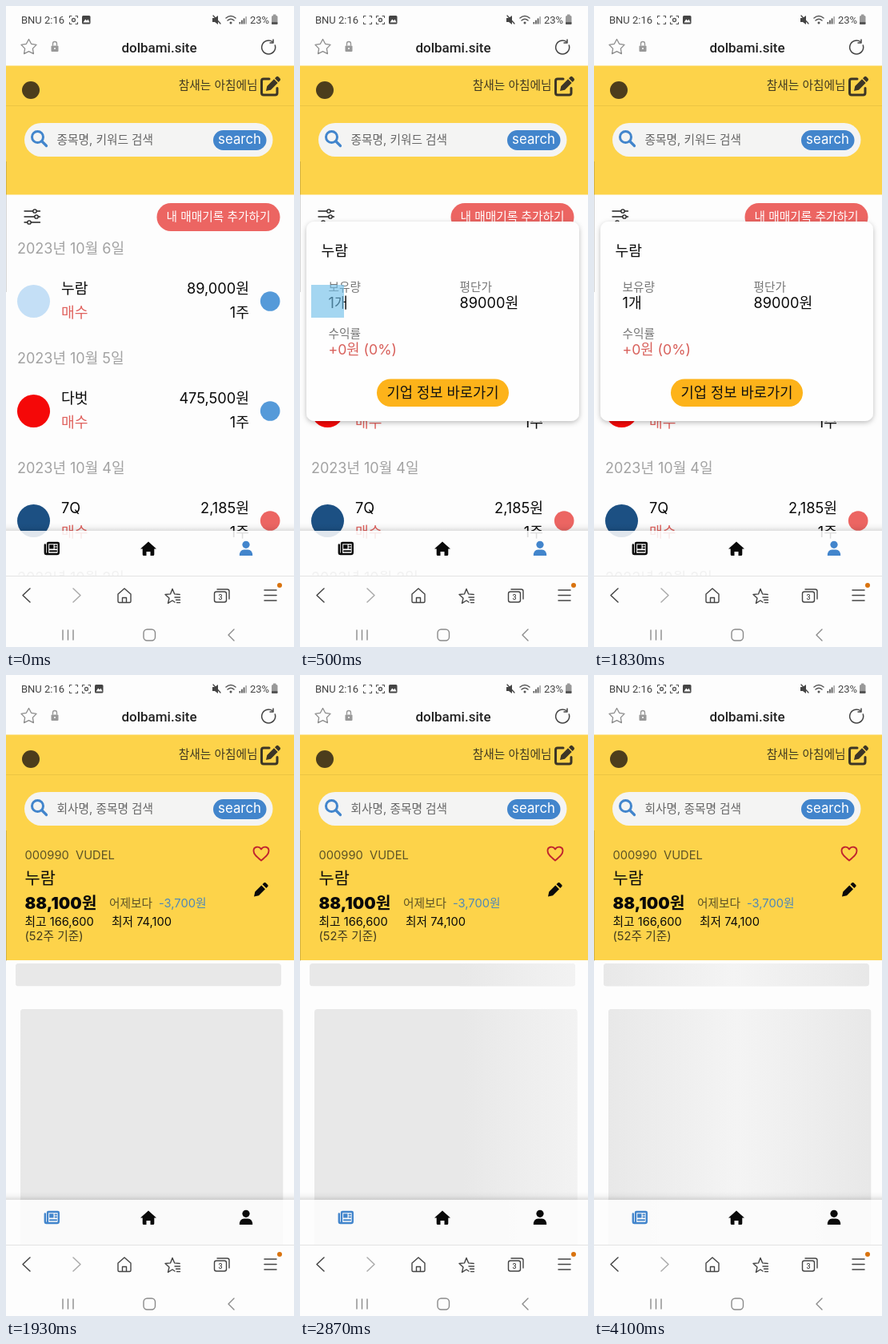
Write an HTML page that moves like this. It is 360 by 800 pixels and loops after 4210 ms.

```html
<!DOCTYPE html>
<html lang="ko">
<head>
<meta charset="utf-8">
<style>
html, body { margin: 0; width: 100%; height: 100%; overflow: hidden; background: #fdfdfd; }
svg { display: block; width: 360px; height: 800px; }
text { font-family: Inter, "Noto Sans CJK KR", "Noto Sans CJK", sans-serif; white-space: pre; }
.ui { font-family: Roboto, sans-serif; }
.line { fill: none; stroke-linecap: round; stroke-linejoin: round; }
</style>
</head>
<body>
<svg id="stage" viewBox="0 0 360 800"></svg>
<script>
const LOOP = 4210, RECORD = 250, TAP = 330, POPUP = 420, RELEASE = 570, PAGE = 1865;
const SHIMMER = 1500;
const BLUE = '#4285cc', RED = '#e0625e', YELLOW = '#fdd34a', OLIVE = '#5d5326';
const SMALL = 14.7, LARGE = 18.2;

const text = (x, y, size, str, fill = '#0a0a0a', extra = '') =>
  `<text x="${x}" y="${y}" font-size="${size}" fill="${fill}" ${extra}>${str}</text>`;
const rect = (x, y, w, h, fill, r = 0, extra = '') =>
  `<rect x="${x}" y="${y}" width="${w}" height="${h}" fill="${fill}" rx="${r}" ${extra}/>`;
const circle = (x, y, r, fill, extra = '') =>
  `<circle cx="${x}" cy="${y}" r="${r}" fill="${fill}" ${extra}/>`;
const line = (d, stroke, width = 1.5, extra = '') =>
  `<path class="line" d="${d}" stroke="${stroke}" stroke-width="${width}" ${extra}/>`;
const shape = (d, fill, extra = '') => `<path d="${d}" fill="${fill}" ${extra}/>`;
const group = (id, body) => `<g id="${id}">${body}</g>`;
const END = 'text-anchor="end"', MID = 'text-anchor="middle"';

function star(cx, cy, r) {
  let d = '';
  for (let i = 0; i < 10; i++) {
    const a = (i / 5 - 0.5) * Math.PI, k = i % 2 ? r * 0.52 : r;
    d += `${i ? 'L' : 'M'}${(cx + k * Math.cos(a)).toFixed(1)} ${(cy + k * Math.sin(a)).toFixed(1)}`;
  }
  return d + 'Z';
}

const brackets = x => line(
  `M${x + 0.5} 14.500v-2h2.500m5 0h2.500v2m0 6v2h-2.500m-5 0h-2.500v-2`, '#555', 1.1);
const lens = (x, id) => group(id, circle(x + 5.5, 17.5, 2, 'none', 'stroke="#555" stroke-width="1.3"'));
const picture = rect(0, 12, 10.5, 10.5, '#444', 1.5) + shape('M1.5 20.500l2.700-4 2 2 1.300-2 2 4z', '#fff');

const statusBar = () =>
  text(19, 22, 13, 'BNU', '#444', 'class="ui"') +
  text(48, 22, 13, '2:16', '#444', 'class="ui"') +
  brackets(79) + lens(79, 'blink') +
  group('second', brackets(95) + lens(95, 'still')) +
  group('picture', picture) +
  shape('M258 15h3l4-3v11l-4-3h-3z', '#444') + line('M259 12l9 10', '#444', 1.3) +
  line('M275 15q6-5 12 0M277 18q4-3.500 8 0', '#555', 1.5) + circle(281, 21, 1.5, '#555') +
  [0, 1, 2, 3].map(i => rect(291.5 + i * 2.6, 20 - i * 2.3, 1.7, 2.5 + i * 2.3, i < 3 ? '#555' : '#aaa')).join('') +
  text(305, 22, 13, '23%', '#444', 'class="ui"') +
  rect(332, 12, 7.5, 11, '#999', 1.5) + rect(334, 10.5, 3.5, 2, '#999') + rect(332, 20, 7.5, 3, '#555', 1);

const addressBar = () =>
  line(star(28.5, 51.5, 10), '#8c8c8c', 1.3) +
  rect(56.5, 49.5, 9, 7.5, '#999', 1) + line('M58.500 49v-2a2.500 2.500 0 0 1 5 0v2', '#999', 1.4) +
  circle(61, 53, 1, '#fff') +
  text(191.5, 58, 17, 'dolbami.site', '#222', `class="ui" font-weight="500" ${MID}`) +
  line('M333 44.500a8.500 8.500 0 1 0 3.300 4.500', '#444', 1.5) + line('M330 46h4v-4', '#444', 1.5);

const editIcon = '#3c3526';
const header = () =>
  rect(0, 124, 360, 1, '#ecc543') +
  circle(31, 105, 11, '#4c3d1c') +
  text(314.5, 104, SMALL, '참새는 아침에님', '#3f3820', END) +
  line('M329 91h-7q-2.500 0-2.500 2.500v15q0 2.500 2.500 2.500h14.500q2.500 0 2.500-2.500v-6', editIcon, 3) +
  shape('M325 106l1.300-6 8.700-8.700 4.700 4.700-8.700 8.700zM336 90.200l2-2q1.200-1 2.400 0l2.200 2.300q1 1.200 0 2.400l-2 2z', editIcon);

const search = hint =>
  rect(23, 146, 310.5, 42, '#f4f4f3', 21) +
  circle(39.5, 163.5, 7, 'none', `stroke="${BLUE}" stroke-width="3"`) +
  line('M45 169l5.500 5.500', BLUE, 3.2) +
  text(63.5, 171.5, SMALL, hint, '#666') +
  rect(259, 155, 66.5, 25, BLUE, 12.5) +
  text(292, 172, 16.8, 'search', '#fff', MID);

function row(i, day, name, price, logo, dot) {
  const y = 302 + 137 * i;
  return text(14, y + 6.5, 18, `2023년 10월 ${day}일`, '#a2a2a2') + (name ?
    circle(34.5, y + 66.5, 20.5, logo) +
    text(69, y + 56.5, LARGE, name) + text(69, y + 86.5, LARGE, '매수', RED) +
    text(304, y + 56.5, LARGE, price, undefined, END) +
    text(304, y + 86.5, LARGE, '1주', undefined, END) +
    circle(330.2, y + 66.5, 12.3, dot) : '');
}

const filterIcon = [[256, 36], [263, 38], [270, 29]].map(([y, x]) =>
  line(`M23 ${y}h19.500`, '#222', 1.3) +
  circle(x, y, 2.2, '#fdfdfd', 'stroke="#222" stroke-width="1.300"')).join('');

const list = () =>
  rect(0, 74.5, 360, 161, YELLOW) + search('종목명, 키워드 검색') + filterIcon +
  rect(188.5, 246, 154, 35, '#ec6562', 17.5) +
  text(265.5, 268, SMALL, '내 매매기록 추가하기', '#fff', MID) +
  row(0, 6, '누람', '89,000원', '#c4dff6', '#559ad9') +
  row(1, 5, '다벗', '475,500원', '#f50808', '#559ad9') +
  row(2, 4, '7Q', '2,185원', '#1c5083', '#ec6562') +
  row(3, 2);

const popup = () =>
  rect(8, 269, 341, 249, '#fefefe', 10, 'filter="url(#shade)"') +
  text(26.5, 312, LARGE, '누람') +
  text(35.5, 355.5, SMALL, '보유량', '#777') + text(35.5, 376.5, LARGE, '1개') +
  text(199.5, 355.5, SMALL, '평단가', '#777') + text(199.5, 376.5, LARGE, '89000원') +
  text(35.5, 414, SMALL, '수익률', '#777') + text(35.5, 435, 17.7, '+0원 (0%)', '#d8605b') +
  rect(96, 465.5, 165, 34.5, '#fdb31a', 17.2) +
  text(178.5, 488.5, 17.7, '기업 정보 바로가기', '#111', MID);

const bone = (id, x, y, w, h) =>
  `<clipPath id="${id}Clip">${rect(x, y, w, h, '#000', 4)}</clipPath>` +
  `<g clip-path="url(#${id}Clip)">${rect(x, y, w, h, '#e8e8e8')}` +
  rect(x, y, w, h, 'url(#glow)', 0, `id="${id}"`) + '</g>';

const stock = () =>
  rect(0, 74.5, 360, 281.5, YELLOW) + search('회사명, 종목명 검색') +
  text(23.5, 230, SMALL, '000990', OLIVE) + text(87, 230, SMALL, 'VUDEL', OLIVE) +
  text(23.5, 261, 20.8, '누람') +
  text(23.5, 292, 20.4, '88,100원', undefined, 'font-weight="900"') +
  text(129, 290, SMALL, '어제보다', OLIVE) + text(191, 290, SMALL, '-3,700원', '#4e88b8') +
  text(23.5, 313, SMALL, '최고 166,600') + text(132, 313, SMALL, '최저 74,100') +
  text(23.5, 331, SMALL, '(52주 기준)', '#433c1e') +
  line('M319 231.500C313 226.500 309.500 223.500 309.500 219.500C309.500 214 316 213 319 217.500C322 213 328.500 214 328.500 219.500C328.500 223.500 325 226.500 319 231.500Z', '#c0242f', 1.9) +
  shape('M310 276.500l1.300-6 8-8 4.700 4.700-8 8zM320.500 261.300l2-2q1-.800 2 0l2.800 2.800q.800 1 0 2l-2 2z', '#0a0a0a') +
  bone('bar', 12, 360, 332, 28.5) + bone('panel', 18, 417, 328.5, 330);

const tabs = () =>
  rect(0, 645, 360, 10, 'url(#lift)') +
  rect(0, 655, 360, 56, '#fdfdfd', 0, 'fill-opacity=".87"') +
  group('news',
    line('M52 671v10.500q0 2.500-1.600 2.500t-1.600-2v-9.500m2 11.500h13q2 0 2-2v-11q0-1-1-1h-11.800q-1 0-1 1', 'currentColor', 2.4) +
    rect(54.2, 672.3, 5.3, 5.2, 'currentColor') +
    line('M61.500 673.500h1.500m-1.500 3h1.500m-8 3.700h8', 'currentColor', 2)) +
  shape('M178 668.500l10 9h-2.700v7q0 1.500-1.500 1.500h-3.300v-5h-5v5h-3.300q-1.500 0-1.500-1.500v-7h-2.700z', '#0a0a0a') +
  group('person', circle(300, 672.3, 4.6, 'currentColor') +
    shape('M291.800 686q0-7.500 6-7.500h4.400q6 0 6 7.500z', 'currentColor'));

const browser = () =>
  rect(0, 711, 360, 89, '#fdfdfd') + rect(0, 711, 360, 1, '#e3e3e3') +
  line('M30 727l-9 8.500 9 8.500', '#444', 1.5) + line('M84 727l9 8.500-9 8.500', '#aaa', 1.5) +
  line('M140 734l8-7 8 7v9q0 1.500-1.500 1.500h-13q-1.500 0-1.500-1.500zM145.500 744v-5.500h5v5.500', '#444', 1.4) +
  line('M211 744l-3-2-5.500 3.300 1.500-6.300-5-4.500 6.500-.600 2.500-6.400 2.700 6.400 6.500.600M211 738h6.500m-5 3.300h5m-4 3.300h4', '#444', 1.4) +
  rect(260.5, 731, 15, 13, 'none', 2.5, 'stroke="#444" stroke-width="1.400"') +
  line('M264 728h12.500q2.500 0 2.500 2.500v9.500', '#444', 1.4) +
  text(268, 741, 9, '3', '#444', `class="ui" font-weight="500" ${MID}`) +
  line('M323 729h15m-15 6.500h15m-15 6.500h15', '#444', 1.5) + circle(342, 723, 3, '#d9730f') +
  line('M71 779v12m6.500-12v12m6.500-12v12', '#8a8a8a', 1.4) +
  rect(172, 778, 14.5, 14, 'none', 4.5, 'stroke="#8a8a8a" stroke-width="1.400"') +
  line('M285 778l-7 7 7 7', '#8a8a8a', 1.4);

const stage = document.getElementById('stage');
stage.innerHTML = `<defs>
  <filter id="shade" x="-10%" y="-10%" width="120%" height="120%">
    <feDropShadow dx="0" dy="2" stdDeviation="3" flood-color="#000" flood-opacity=".26"/>
  </filter>
  <linearGradient id="lift" x2="0" y2="1">
    <stop stop-opacity="0"/><stop offset=".5" stop-opacity=".03"/><stop offset="1" stop-opacity=".12"/>
  </linearGradient>
  <linearGradient id="glow">
    <stop stop-color="#e8e8e8"/><stop offset=".5" stop-color="#f4f4f4"/><stop offset="1" stop-color="#e8e8e8"/>
  </linearGradient></defs>` +
  rect(0, 0, 360, 800, '#fdfdfd') +
  group('list', list()) + group('stock', stock()) + header() +
  group('popup', popup()) + rect(14, 348, 41, 41, '#6fbfea', 0, 'id="tap"') +
  rect(0, 194, 1, 163, '#000', 0, 'opacity=".15"') +
  tabs() + browser() + statusBar() + addressBar();

const $ = id => document.getElementById(id);
const show = (id, on) => $(id).setAttribute('visibility', on ? 'visible' : 'hidden');

// cubic-bezier(.42, 0, .58, 1)
function easeInOut(p) {
  let lo = 0, hi = 1, s = 0.5;
  for (let i = 0; i < 18; i++) {
    s = (lo + hi) / 2;
    const x = 1.26 * s * (1 - s) ** 2 + 1.74 * s * s * (1 - s) + s ** 3;
    if (x < p) lo = s; else hi = s;
  }
  return s * s * (3 - 2 * s);
}

function draw(t) {
  const onStock = t >= PAGE, recording = t >= RECORD;
  show('list', !onStock);
  show('stock', onStock);
  show('popup', t >= POPUP && !onStock);
  $('tap').setAttribute('opacity', t < TAP ? 0 : 0.62 * Math.min(1, Math.max(0, 1 - (t - RELEASE) / 60)));
  $('news').setAttribute('color', onStock ? BLUE : '#0a0a0a');
  $('person').setAttribute('color', onStock ? '#0a0a0a' : BLUE);

  show('blink', !recording || t % 1000 < 480);
  show('second', recording);
  $('picture').setAttribute('transform', `translate(${recording ? 111 : 95} 0)`);

  const phase = Math.max(0, t - PAGE + 10) / SHIMMER % 1;
  const shift = 2 * easeInOut(phase) - 1;
  $('bar').setAttribute('x', 12 + shift * 332);
  $('panel').setAttribute('x', 18 + shift * 328.5);
}

const start = performance.now();
(function tick() {
  draw((performance.now() - start) % LOOP);
  requestAnimationFrame(tick);
})();
</script>
</body>
</html>
```
